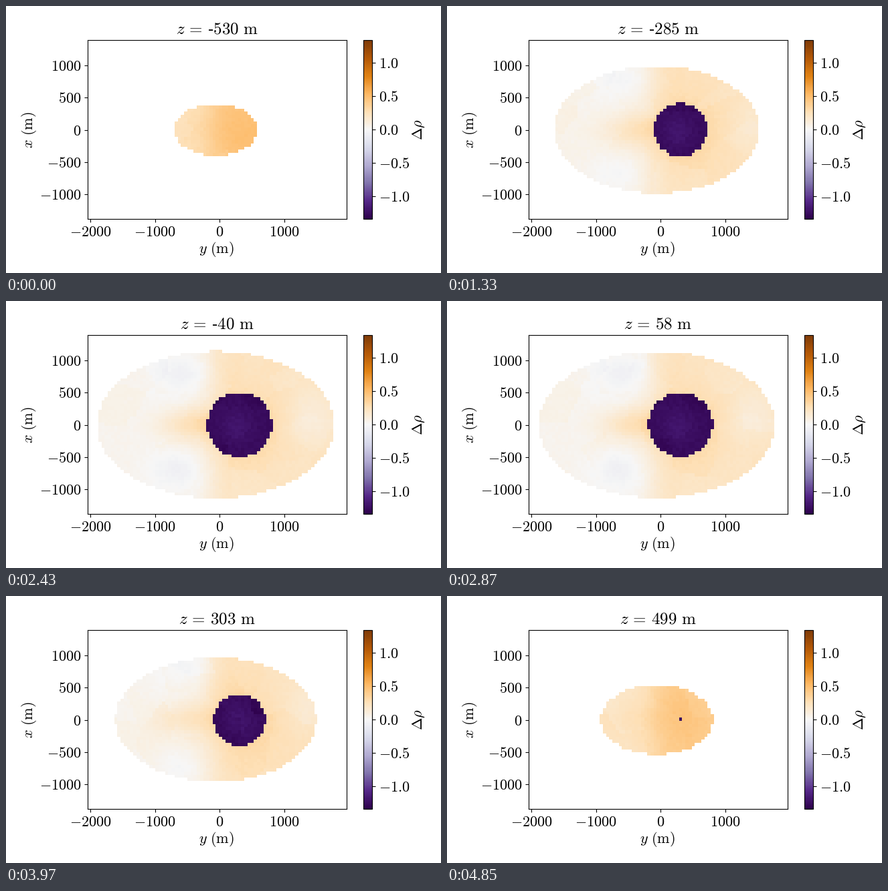
Recreate the animation shown at these times as a matplotlib script. Size 650x400 px, loop 5070 ms.

```python
import numpy as np
import matplotlib.pyplot as plt
from matplotlib.animation import FuncAnimation

W, H, DPI = 650, 400, 100
LOOP, INTERVAL = 5070, 30
FIRST, STEP, SLICES = 450, 220, 22
CELL, VMAX = 49, 1.34
CORE_Y, CORE_R = 307, 500               # dense-core sphere
BODY = dict(y0=-60.6, a=1835, b=1140, c=566)

plt.rcParams.update({"mathtext.fontset": "cm", "font.size": 16})

y_axis = CORE_Y + CELL * np.arange(-44, 30)
x_axis = 8.7 + CELL * np.arange(-23, 24)
Y, X = np.meshgrid(y_axis, x_axis)

rng = np.random.default_rng(4)
seeds = rng.uniform((-1900, -1150, -570), (1800, 1150, 570), (90, 3))
patch_level = rng.uniform(-1, 1, len(seeds))
grain = rng.uniform(-1, 1, Y.shape)


def bump(y, x, wy, wx):
    return np.exp(-((Y - y) / wy) ** 2 - ((X - x) / wx) ** 2)


def patches(z):
    dist = sum((axis[..., None] - seeds[:, i]) ** 2
               for i, axis in enumerate((Y, X, np.full_like(Y, z, dtype=float))))
    return patch_level[dist.argmin(axis=-1)]


def density(z):
    """Density contrast on the horizontal plane at height z, masked outside the body."""
    u = z / BODY["c"]
    mottle = patches(z)
    core_dist = np.sqrt((Y - CORE_Y) ** 2 + X ** 2 + z ** 2)
    mantle = (0.04 + 0.17 / (1 + np.exp(-(Y + 130) / 110))
              + 0.07 * np.exp(-np.clip(core_dist - CORE_R, 0, None) / 250)
              + 0.20 * (1 - u * u) * bump(-420, 0, 500, 250)
              - 0.12 * (1 - u * u) * (bump(-580, 800, 400, 330) + bump(-640, -700, 400, 330))
              - 0.10 * (1 - u * u) * bump(1400, 150, 400, 450)
              + 0.25 * u ** 4 + 0.025 * mottle + 0.01 * grain)
    core = (-1.29 + 0.08 * bump(230, -20, 240, 240)
            + 0.035 * mottle + 0.02 * grain)
    values = np.where(core_dist < CORE_R, core, mantle)
    shape = ((Y - BODY["y0"]) / BODY["a"]) ** 2 + (X / BODY["b"]) ** 2 + u * u
    return np.ma.masked_where(shape > 1, values)


def title_text(z):
    sign = "\u2010" if z < 0 else ""
    return (r"$z\hspace{0.17}=\hspace{0.17}\mathrm{%s%d}\hspace{0.35}\mathrm{m}$"
            % (sign, abs(z)))


def add_axes(left, top, right, bottom):
    return fig.add_axes([left / W, 1 - bottom / H, (right - left) / W, (bottom - top) / H])


def label(x, y, text, rotation=0):
    fig.text(x / W, 1 - y / H, text, ha="center", va="center", rotation=rotation)


def math_labels(ticks, fmt):
    return [f"${t:{fmt}}$" for t in ticks]


heights = [-530 + 49 * i for i in range(SLICES)]
planes = [density(z) for z in heights]

fig = plt.figure(figsize=(W / DPI, H / DPI), dpi=DPI, facecolor="white")
ax = add_axes(122.2, 51.2, 509.2, 319.2)
half = CELL / 2
image = ax.imshow(planes[0], cmap="PuOr_r", vmin=-VMAX, vmax=VMAX, origin="lower",
                  interpolation="nearest", aspect="auto",
                  extent=(y_axis[0] - half, y_axis[-1] + half,
                          x_axis[0] - half, x_axis[-1] + half))
ax.set(xlim=(-2039, 1961), ylim=(-1381, 1389))
y_ticks, x_ticks = range(-2000, 1001, 1000), range(-1000, 1001, 500)
ax.set_xticks(y_ticks, math_labels(y_ticks, "d"))
ax.set_yticks(x_ticks, math_labels(x_ticks, "d"))
title = ax.set_title(title_text(heights[0]), fontsize=18, pad=7.2)

bar = fig.colorbar(image, cax=add_axes(534.2, 51.2, 547.2, 319.2))
bar_ticks = (-1.0, -0.5, 0.0, 0.5, 1.0)
bar.set_ticks(bar_ticks, labels=math_labels(bar_ticks, ".1f"))

unit = r"\hspace{0.33}\mathrm{(m)}"
label(314.5, 364.5, f"$y{unit}$")
label(34.8, 185.8, f"$x{unit}$", 90)
label(616.7, 185, r"$\Delta\rho$", 90)


def update(frame):
    t = (frame + 1) * INTERVAL - 1
    i = 0 if t < FIRST else min(1 + (t - FIRST) // STEP, SLICES - 1)
    image.set_data(planes[i])
    title.set_text(title_text(heights[i]))
    return image, title


anim = FuncAnimation(fig, update, frames=LOOP // INTERVAL, interval=INTERVAL,
                     repeat=True, repeat_delay=0, blit=False)
plt.show()
```
